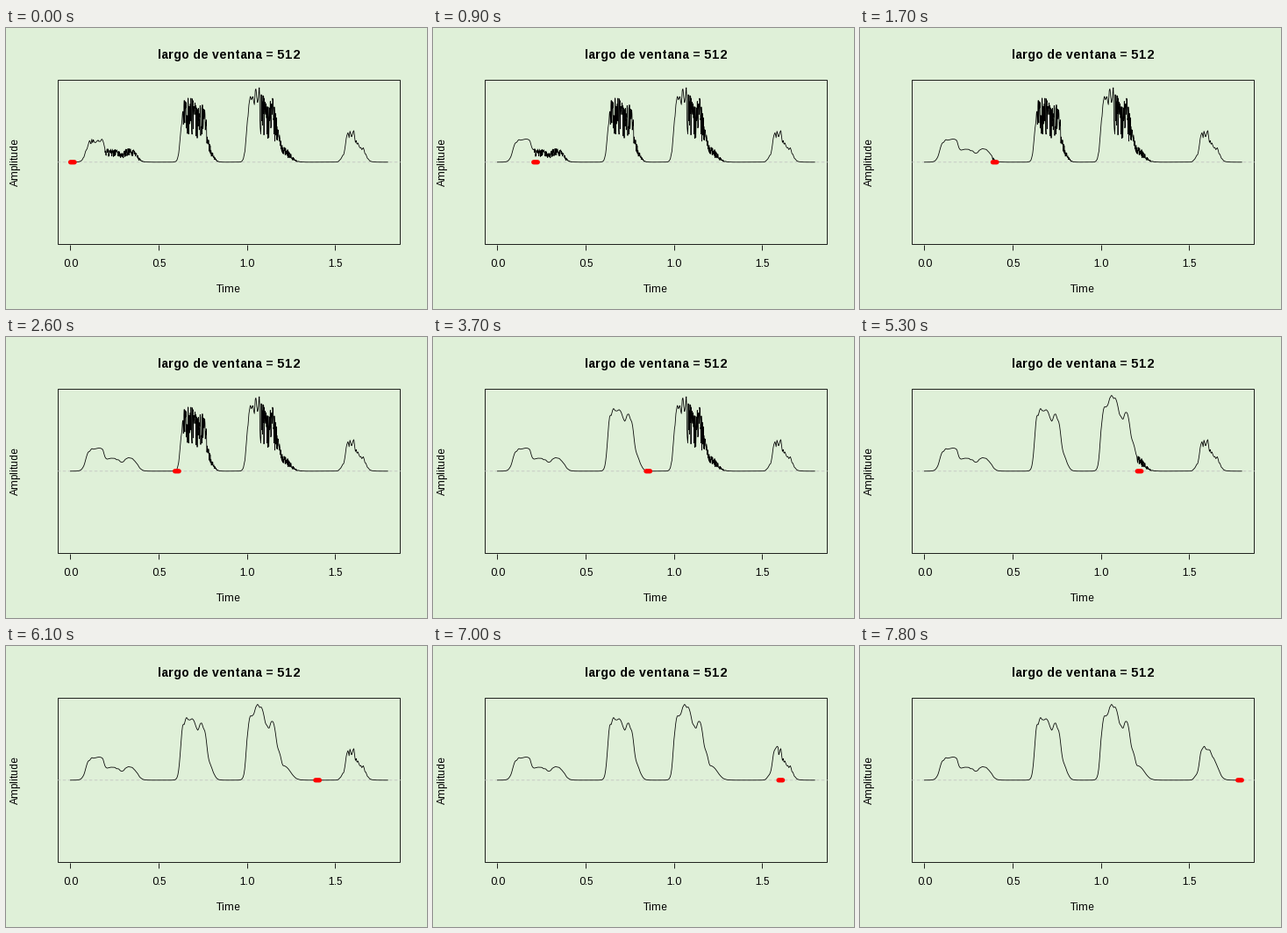
A matplotlib script for the animation above (7900 ms loop, 480x320 px).

```python
import numpy as np
import matplotlib.pyplot as plt
from matplotlib.animation import FuncAnimation
from matplotlib.patches import Rectangle

plt.rcParams["text.hinting_factor"] = 1     # whole-pixel letter spacing

W, H, DPI = 480, 320, 100
FRAMES, INTERVAL = 79, 100
PX = 72 / DPI                       # points per pixel
BG = "#dff0d8"
LEFT, RIGHT, TOP, BOTTOM = 59.04, 449.76, 59.04, 246.56
CENTER, MID = (LEFT + RIGHT) / 2, (TOP + BOTTOM) / 2
PAD = (RIGHT - LEFT) * 0.04 / 1.08
X0, X1 = LEFT + PAD, RIGHT - PAD    # first and last sample
PEAK = (BOTTOM - TOP) / 2 / 1.08
STEP = (X1 - X0) / FRAMES           # width of one window
SECOND = 201.55                     # pixels per second

# Each sound: start, where it turns rough, roughness,
# and soft steps of its loudness as (x, rise, softness)
SOUNDS = [
    (79, 113, 0.62, [(91, 26.5, 2), (111.5, -12.5, 1), (129, -4.5, 1.2),
                     (135, 5.5, 0.8), (150, -15, 2.3)]),
    (193, 202, 0.6, [(199, 69, 1.3), (216, -12, 1.2), (221, 6, 0.6),
                     (228.8, -43, 1.1), (236, -20, 2)]),
    (268, 289, 0.68, [(274.2, 75, 1.3), (284, 11, 2.5), (294, -29, 1.8),
                      (301, 14, 0.7), (308, -40, 1.2), (313.5, -14, 1),
                      (325, -17, 3)]),
    (376, 390, 0.4, [(381, 6, 1.2), (387, 31, 1.1), (400, -11, 1.5),
                     (408.5, -26, 2.5)]),
]

rng = np.random.default_rng(12)


def soft_step(x, at, width):
    return 1 / (1 + np.exp(np.clip((at - x) / width, -50, 50)))


def loudness(x):
    return sum(rise * soft_step(x, at, width)
               for *_, steps in SOUNDS for at, rise, width in steps)


def noise(x, spacing):
    grid = np.arange(X0, X1 + spacing, spacing)
    return np.interp(x, grid, rng.random(grid.size))


def to_y(height):
    return MID - np.clip(height, 0, PEAK)


smooth_x = np.linspace(X0, X1, 400)
smooth_y = to_y(loudness(smooth_x) * (0.94 + 0.12 * noise(smooth_x, 2.2)))

raw_x = np.linspace(X0, X1, 1100)
depth = np.full(raw_x.size, 0.25)
for start, rough, amount, _ in SOUNDS:
    depth[raw_x >= start] = 0.25
    depth[raw_x >= rough] = amount
fast, slow = rng.random(raw_x.size) ** 1.5, noise(raw_x, 0.9)
dip = depth * np.where(depth > 0.5, fast, slow)
raw_y = to_y(loudness(raw_x) * (1.06 - dip))

fig = plt.figure(figsize=(W / DPI, H / DPI), dpi=DPI, facecolor=BG)
ax = fig.add_axes([0, 0, 1, 1])
ax.set_xlim(0, W)
ax.set_ylim(H, 0)
ax.axis("off")


def label(x, y, text, size=12, **kw):
    ax.text(x, y, text, fontsize=size * PX, fontname="Liberation Sans",
            ha="center", va="baseline", rotation_mode="anchor", **kw)


ax.plot([LEFT, RIGHT], [MID, MID], color="#bebebe", lw=0.75 * PX,
        dashes=(4, 4), dash_capstyle="round", snap=False)
ax.add_patch(Rectangle((59, 59), 390, 187, fill=False,
                       ec="black", lw=0.85 * PX))
for i in range(4):
    tick = X0 + i * SECOND / 2
    ax.plot([tick - 0.5] * 2, [BOTTOM, 253.4], color="black", lw=0.85 * PX,
            solid_capstyle="butt")
    label(tick, 272, f"{i / 2:.1f}")

label(CENTER, 35, "largo de ventana = 512", 14.4, weight="bold")
label(CENTER, 301, "Time")
label(14, MID, "Amplitude", rotation=90)

wave, = ax.plot([], [], color="black", lw=0.8 * PX,
                solid_joinstyle="round", snap=False)
window, = ax.plot([], [], color="red", lw=5.3 * PX,
                  solid_capstyle="round", snap=False)


def update(n):
    cut = X0 + n * STEP
    done, rest = smooth_x < cut, raw_x >= cut
    wave.set_data(np.concatenate([smooth_x[done], raw_x[rest]]),
                  np.concatenate([smooth_y[done], raw_y[rest]]))
    window.set_data([cut, cut + STEP], [MID, MID])
    return wave, window


anim = FuncAnimation(fig, update, frames=FRAMES, interval=INTERVAL,
                     repeat=True, repeat_delay=0, blit=False)
plt.show()
```
